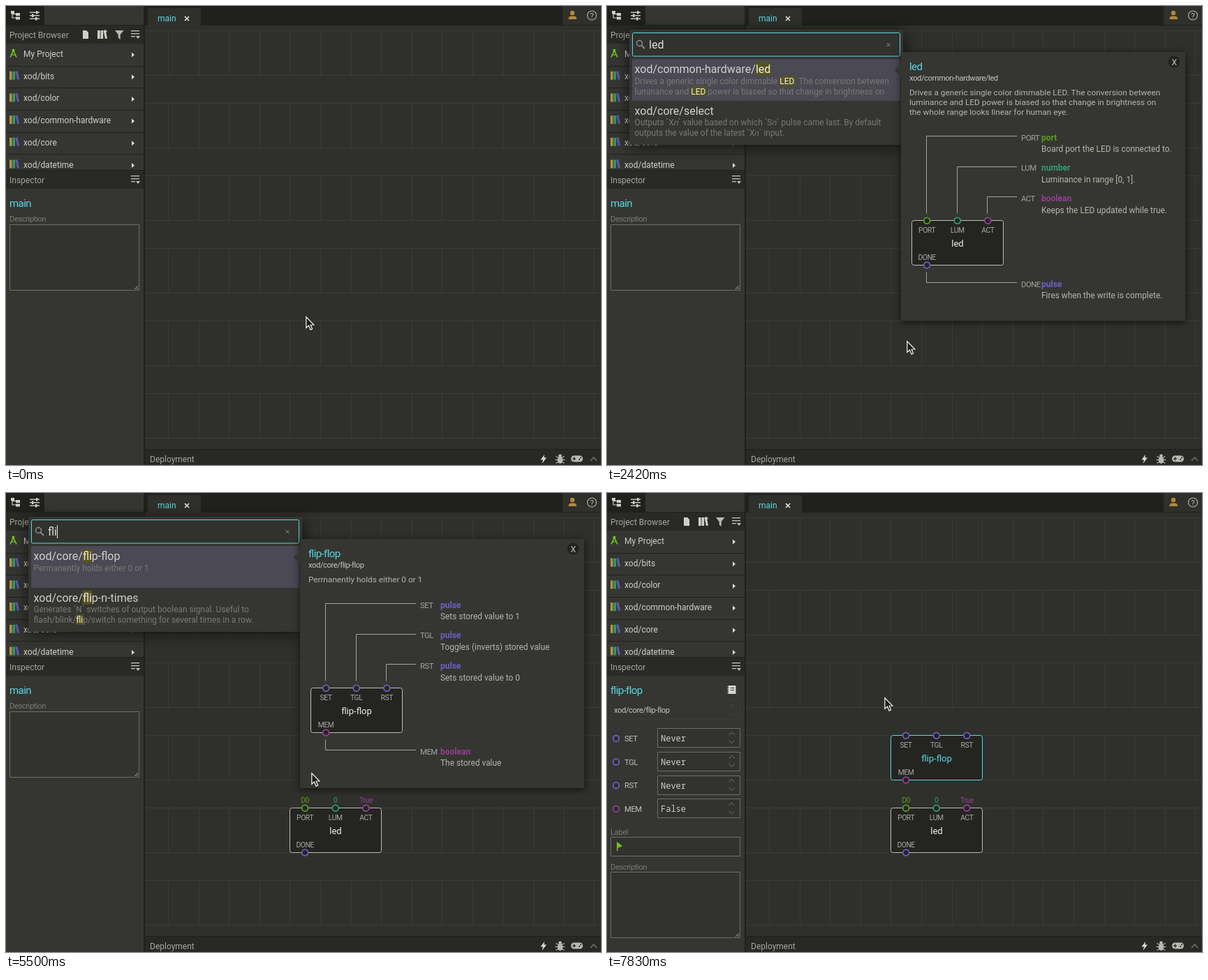
An HTML page with a canvas that plays this animation: 852 px wide and 658 px high, repeating every 8000 ms.

```html
<!DOCTYPE html>
<html lang="en">
<head>
<meta charset="utf-8">
<title>Quick node search</title>
<style>
html, body { margin: 0; width: 100%; height: 100%; overflow: hidden; background: #2f302b; }
canvas { display: block; }
</style>
</head>
<body>
<canvas id="stage" width="852" height="658"></canvas>
<script>
const g = document.getElementById('stage').getContext('2d');
const LOOP = 8000;
const SANS = 'Roboto, "Open Sans", sans-serif';
const MONO = '"Noto Sans Mono", "DejaVu Sans Mono", monospace';
const PITCH = 43.6, ROW = 59.5;

const C = {
  side: '#353632', head: '#292a26', top: '#20211d', canvas: '#2f302b', grid: '#3b3c37',
  cyan: '#5bd6e3', text: '#cfcfca', dim: '#7b7b75', soft: '#a5a59f', line: '#6c6d67',
  port: '#5a9e1c', number: '#2f9e73', boolean: '#933f97', pulse: '#6a5fc6', node: '#242521'
};

// Node library: inputs and outputs are [label, type, description lines...]
const NODES = {
  led: {
    path: 'xod/common-hardware/led',
    desc: ['Drives a generic single color dimmable LED. The conversion between',
      'luminance and LED power is biased so that change in brightness on',
      'the whole range looks linear for human eye.'],
    ins: [['PORT', 'port', 'Board port the LED is connected to.'],
      ['LUM', 'number', 'Luminance in range [0, 1].'],
      ['ACT', 'boolean', 'Keeps the LED updated while true.']],
    out: ['DONE', 'pulse', 'Fires when the write is complete.'],
    values: ['D0', '0', 'True']
  },
  'flip-flop': {
    path: 'xod/core/flip-flop',
    desc: ['Permanently holds either 0 or 1'],
    ins: [['SET', 'pulse', 'Sets stored value to 1'],
      ['TGL', 'pulse', 'Toggles (inverts) stored value'],
      ['RST', 'pulse', 'Sets stored value to 0']],
    out: ['MEM', 'boolean', 'The stored value']
  },
  'flip-n-times': {
    path: 'xod/core/flip-n-times',
    desc: ['Generates `N` switches of output boolean signal. Useful to',
      'flash/blink/flip/switch something for several times in a row.'],
    ins: [['N', 'number', 'Number of switches'],
      ['T', 'number', 'Time between switches'],
      ['RUN', 'pulse', 'Starts the sequence']],
    out: ['OUT', 'boolean', 'The current state']
  },
  clip: {
    path: 'xod/math/clip',
    desc: ['Clips an input value so that the value is always inside a [MIN, MAX] range.'],
    ins: [['X', 'number', 'The input value'],
      ['MIN', 'number', 'A lower bound of the range.'],
      ['MAX', 'number', 'An upper bound of the range.']],
    out: ['OUT', 'number', 'The result. Equals to `X` if it is', 'already in the range, otherwise, its',
      '`Xc` rounded to a nearest bound:', '`MIN` or `MAX`.']
  }
};

// Search results: [path, description lines...]
const R = {
  led: ['xod/common-hardware/led', ...NODES.led.desc.slice(0, 2)],
  less: ['xod/core/less', 'Outputs true if `IN1` < `IN2`, and false otherwise'],
  shift: ['xod/bits/shift-left', 'Performs logical left-shift of `IN` by `N` bits.'],
  clear: ['xod-dev/text-lcd/clear', 'Clears the LCD screen and positions the cursor in the upper-left corner'],
  mems: ['xod-dev/st-mems/example'],
  throttle: ['xod/core/throttle', 'Throttles input changes to happen no more often than once per interval',
    'specified. Useful to limit the rate of updates.'],
  json: ['xod/json/0-example'],
  select: ['xod/core/select', 'Outputs `X\u{1D45B}` value based on which `S\u{1D45B}` pulse came last. By default',
    'outputs the value of the latest `X\u{1D45B}` input.'],
  avail: ['xod/uart/is-available', 'Checks does UART have an available bytes to read'],
  bool: ['xod/json/boolean-value', 'Extracts a boolean from a JSON stream'],
  flop: ['xod/core/flip-flop', 'Permanently holds either 0 or 1'],
  times: ['xod/core/flip-n-times', ...NODES['flip-n-times'].desc],
  mapclip: ['xod/math/map-clip', 'Projects a number from one range to another preserving ratio. Then',
    'clips a result to the target range.'],
  clip: ['xod/math/clip', 'Clips an input value so that the value is always inside a [MIN, MAX]', 'range.'],
  mutex: ['xod/mutex/mutex', 'Describes a mutually exclusive resource. Used to avoid conflicts',
    'between nodes controlling long-running processes. No two processes']
};
const pick = keys => keys.split(' ').map(k => R[k]);
const LISTS = {
  le: pick('led less shift clear mems throttle json select avail bool'),
  led: pick('led select'),
  fl: pick('flop times mapclip clip mutex throttle less shift json bool'),
  fli: pick('flop times'),
  flip: pick('flop times mapclip clip mutex')
};

// Each entry changes only the listed parts of the state.
const CLOSED = { open: false, tip: '', list: '', query: '', sel: 0, caret: false };
const STEPS = [
  [0, { ...CLOSED, focus: false, nodes: [], active: '' }],
  [830, { open: true, caret: true }],
  [1000, { focus: true }],
  [1330, { caret: false }],
  [1580, { query: 'l', caret: true }],
  [1750, { query: 'le', list: 'le' }],
  [1830, { tip: 'led' }],
  [1920, { query: 'led', list: 'led' }],
  [2420, { caret: false }],
  [2920, { ...CLOSED, focus: false, nodes: [['led', 451.5]], active: 'led' }],
  [4080, { active: '' }],
  [4170, { open: true }],
  [4250, { focus: true, caret: true }],
  [4750, { caret: false }],
  [5170, { query: 'f', caret: true }],
  [5330, { query: 'fl', list: 'fl' }],
  [5420, { tip: 'flip-flop' }],
  [5500, { query: 'fli', list: 'fli' }],
  [5670, { query: 'flip', list: 'flip' }],
  [6170, { caret: false }],
  [6420, { sel: 3, tip: 'clip' }],
  [6500, { sel: 1, tip: 'flip-n-times' }],
  [6580, { sel: 0, tip: 'flip-flop' }],
  [7000, { focus: false }],
  [7500, { ...CLOSED, nodes: [['led', 451.5], ['flip-flop', 347.5]], active: 'flip-flop' }]
];
const POINTER = [
  [0, 429, 445], [80, 429, 454], [170, 429, 466], [330, 429, 471], [420, 429, 476], [830, 429, 480],
  [2920, 429, 486], [3080, 334, 439], [3250, 334, 437], [3420, 401, 414], [3830, 437, 401],
  [6330, 430, 381], [6420, 413, 333], [6500, 368, 212], [6580, 330, 122], [6670, 316, 90],
  [7670, 331, 128], [7750, 372, 235], [7830, 397, 293]
];

function stateAt(t) {
  const s = {};
  for (const [at, change] of STEPS) if (at <= t) Object.assign(s, change);
  return s;
}

function box(x, y, w, h, color) { g.fillStyle = color; g.fillRect(x, y, w, h); }

function frame(x, y, w, h, color, r = 0, fill) {
  g.beginPath();
  g.roundRect(x, y, w, h, r);
  if (fill) { g.fillStyle = fill; g.fill(); }
  g.strokeStyle = color; g.lineWidth = 1; g.stroke();
}

function poly(points, color, width) {
  g.beginPath();
  for (let i = 0; i < points.length; i += 2) g.lineTo(points[i], points[i + 1]);
  if (width) { g.strokeStyle = color; g.lineWidth = width; g.stroke(); }
  else { g.fillStyle = color; g.fill(); }
}

function dot(x, y, r, color) {
  g.beginPath(); g.arc(x, y, r, 0, 7);
  g.fillStyle = color; g.fill();
}

function ring(x, y, r, color, width = 1, fill) {
  g.beginPath(); g.arc(x, y, r, 0, 7);
  if (fill) { g.fillStyle = fill; g.fill(); }
  g.strokeStyle = color; g.lineWidth = width; g.stroke();
}

function text(s, x, y, color = C.text, size = 12, align = 'left', family = SANS, weight = '') {
  g.font = `${weight} ${size}px ${family}`;
  g.textAlign = align;
  g.fillStyle = color;
  g.fillText(s, x, y);
}

// Tighter setting for the narrow labels.
function narrow(s, x, y, color, size = 12, align) {
  g.letterSpacing = `${-0.038 * size}px`;
  text(s, x, y, color, size * 0.94, align);
  g.letterSpacing = '0px';
}

function marked(s, x, y, size, color, query) {
  g.font = `${size}px ${SANS}`;
  for (const part of s.split(new RegExp(`(${query})`, 'i'))) {
    const w = g.measureText(part).width;
    const hit = part.toLowerCase() === query;
    if (hit) box(x - 0.5, y - size, w + 1, size * 1.22, '#57531f');
    text(part, x, y, hit ? '#f1f1e2' : color, size);
    x += w;
  }
}

function menuIcon(y) {
  for (let i = 0; i < 3; i++) box(179, y - 6 + i * 4, i < 2 ? 12 : 6, 1.3, '#c2c2bc');
  poly([186, y + 2, 192, y + 2, 189, y + 6], '#c2c2bc');
}

function books(x, y, colors) {
  box(x, y - 6, 3.6, 12, colors[0]);
  box(x + 4.5, y - 6, 3.6, 12, colors[1]);
  poly([x + 8.5, y - 6, x + 11.5, y - 6.5, x + 14, y + 5.5, x + 11, y + 6], colors[2]);
}

function topBar() {
  const ink = '#d0d0ca';
  box(0, 0, 852, 28, C.top);
  box(55, 0, 142, 27, C.side);
  box(797, 0, 55, 27, C.canvas);
  poly([9, 9, 9, 17, 14, 17], ink, 1.2);
  poly([9, 11.5, 14, 11.5], ink, 1.2);
  box(7, 7, 5, 4, ink); box(14, 10, 6, 4, ink); box(14, 15.5, 6, 4, ink);
  [[8.5, 43], [13, 37], [17.5, 42]].forEach(([y, x]) => {
    box(34, y, 14, 1.4, ink); box(x, y - 1.5, 2.5, 4.5, ink);
  });
  g.beginPath(); g.roundRect(203, 3, 76, 30, [3, 3, 0, 0]); g.fillStyle = C.canvas; g.fill();
  text('main', 217, 22, C.cyan);
  poly([256, 15, 262, 21], '#e0e0da', 1.7);
  poly([262, 15, 256, 21], '#e0e0da', 1.7);
  dot(811, 10, 3.2, '#b5873c');
  g.beginPath(); g.roundRect(805.5, 14.5, 11.5, 4.5, [4, 4, 0, 0]); g.fill();
  ring(839, 13.5, 6.5, '#aeaea8', 1.2);
  text('?', 839, 17.5, '#bdbdb7', 11, 'center');
}

function grid() {
  box(199, 28, 653, 608, C.canvas);
  g.fillStyle = C.grid;
  for (let y = 35; y < 630; y += 104) {
    g.fillRect(199, y, 653, 1);
    g.fillRect(199, y + 64, 653, 1);
    for (let x = 232.4; x < 852; x += PITCH) g.fillRect(Math.floor(x), y, 1, 64);
  }
}

function bottomBar() {
  const ink = '#b9b9b3';
  box(199, 635, 653, 23, '#282925');
  box(199, 635, 653, 1.5, '#21221e');
  text('Deployment', 206, 654, C.soft);
  poly([771, 643, 765.5, 650.5, 769, 650.5, 767.5, 656, 774, 647.5, 770.5, 647.5], '#dadad4');
  g.beginPath(); g.ellipse(793.5, 651, 3.8, 5, 0, 0, 7); g.fillStyle = ink; g.fill();
  dot(793.5, 645, 2.4, ink);
  for (const d of [-1, 1]) {
    poly([793.5, 650.5, 793.5 + d * 7, 650.5], ink, 1.2);
    poly([793.5, 649, 793.5 + d * 6, 645.5], ink, 1.2);
    poly([793.5, 652, 793.5 + d * 6, 655.5], ink, 1.2);
  }
  g.beginPath(); g.roundRect(809, 644.5, 17, 9, 4.5); g.fillStyle = ink; g.fill();
  box(811, 648.5, 5, 1.3, '#282925'); box(812.9, 646.6, 1.3, 5, '#282925');
  dot(821, 650, 1.1, '#282925'); dot(823, 647.5, 1.1, '#282925');
  poly([837, 652, 841.5, 647, 846, 652], '#6b6c66', 1.8);
}

function browser() {
  box(0, 28, 197, 630, C.side);
  box(0, 28, 197, 26, C.head);
  text('Project Browser', 5, 45.5, C.soft);
  const ink = '#d0d0ca';
  poly([110, 35, 115, 35, 118, 38, 118, 47, 110, 47], ink);
  books(131, 41, [ink, ink, ink]);
  box(140, 36, 5, 1.2, ink); box(142, 34, 1.2, 5, ink);
  poly([156, 35, 168.5, 35, 163.7, 41, 163.7, 48, 160.7, 45.5, 160.7, 41], '#b9b9b3');
  menuIcon(41);
  g.save();
  g.beginPath(); g.rect(0, 54, 197, 181); g.clip();
  ['My Project', 'xod/bits', 'xod/color', 'xod/common-hardware', 'xod/core', 'xod/datetime'].forEach((s, i) => {
    const y = 69 + i * 31.7;
    box(0, Math.round(y + 16.5), 197, 1, '#20211d');
    text(s, 25, Math.round(y + 4), C.text);
    poly([180, y - 2.5, 184, y + 1, 180, y + 4.5], '#dededa');
    if (i) books(5, y - 1, ['#b3923d', '#2d9a72', '#6058b0']);
    else {
      poly([6, 73.5, 10.5, 64, 15, 73.5], '#72c31e', 1.7);
      poly([7.5, 70, 13.5, 70], '#72c31e', 1.3);
      dot(10.5, 63.5, 2, '#72c31e');
    }
  });
  g.restore();
  box(0, 235, 197, 27, C.head);
  box(0, 235, 197, 1, '#1f201c');
  text('Inspector', 5, 253.5, C.soft);
  menuIcon(249);
  box(197, 0, 2, 658, '#20211d');
}

function area(y) {
  frame(5.5, y + 0.5, 185, 94, C.line, 0, '#32332e');
  poly([184, y + 93, 189, y + 88], '#b0b0aa', 1);
  poly([187, y + 93, 189, y + 91], '#b0b0aa', 1);
}

function arrows(y, color) {
  poly([174.5, y - 4, 178.5, y - 8, 182.5, y - 4], color, 1);
  poly([174.5, y + 4, 178.5, y + 8, 182.5, y + 4], color, 1);
}

function inspector(name) {
  narrow(name || 'main', 5, 287.5, C.cyan, 16);
  if (!name) {
    narrow('Description', 5, 309, C.dim);
    area(313);
    return;
  }
  const n = NODES[name];
  box(174, 276, 10.5, 12, '#d4d4ce');
  for (let y = 277; y < 288; y += 3) box(172.5, y, 3, 1.2, '#d4d4ce');
  box(177, 279, 5, 1, C.side); box(177, 282, 5, 1, C.side);
  frame(5.5, 297.5, 185, 27, '#3b3c37');
  narrow(n.path, 10, 315, '#c4c4be');
  arrows(311, '#474842');
  const fields = name === 'led' ? ['D0', '0', 'True', 'pulse'] : ['Never', 'Never', 'Never', 'False'];
  [...n.ins, n.out].forEach(([label, type], i) => {
    const y = 351.3 + i * 33.7, v = fields[i], top = Math.round(y - 14) + 0.5;
    ring(13, y + 0.5, 4.3, C[type], 1.8, '#2c2d28');
    narrow(label, 25, y + 4.5, '#c0c0ba');
    if (v === 'pulse') {
      frame(72.5, top, 118, 27, '#3c3d38');
      text(v, 131.5, y + 5, '#52534d', 12, 'center', MONO);
      return;
    }
    frame(72.5, top, 118, 27, C.line, 0, '#32332e');
    const right = v.length < 3;
    text(v, right ? 186.5 : 77, y + 5, C.text, 12, right ? 'right' : 'left', MONO);
    if (!right) arrows(y - 0.5, '#777872');
  });
  narrow('Label', 5, 489.5, C.dim);
  frame(5.5, 493.5, 185, 27, C.line, 0, '#32332e');
  poly([14, 500, 22, 506, 15.5, 509, 15.5, 513, 14, 513], '#72c31e');
  narrow('Description', 5, 539.5, C.dim);
  area(543);
}

function node(name, x, y, active, values) {
  const n = NODES[name];
  frame(x, y, 131, 64, active ? C.cyan : '#bcbcb6', 3, C.node);
  const pin = (p, px, py, labelY) => {
    ring(px, py, 4.4, C[p[1]], 1.8, C.node);
    narrow(p[0], px, labelY, '#a9a9a3', 11, 'center');
  };
  n.ins.forEach((p, i) => {
    const px = x + 21.6 + i * PITCH;
    pin(p, px, y + 0.3, y + 17.5);
    if (values && n.values) narrow(n.values[i], px, y - 8, C[p[1]], 11, 'center');
  });
  pin(n.out, x + 21.6, y + 64, y + 56);
  text(name, x + 65.5, y + 37, active ? C.cyan : '#eeeeea', 13, 'center');
}

function panel(x, y, w, h, blur, drop) {
  g.save();
  g.shadowColor = 'rgba(0,0,0,.65)';
  g.shadowBlur = blur;
  g.shadowOffsetY = drop;
  box(x, y, w, h, '#353631');
  g.restore();
}

function search(s) {
  const list = LISTS[s.list] || [];
  const bottom = list.length ? 80 + ROW * list.length : 76;
  panel(32, 34, 392, bottom - 34, 20, 3);
  frame(36.5, 38.5, 383, 33.5, s.focus ? C.cyan : '#777872', 2, '#31322d');
  ring(46.5, 53.5, 4, '#8d8e88', 1.5);
  poly([49.5, 56.5, 54, 61], '#8d8e88', 1.8);
  text(s.query, 60, 61, '#dfdfd9', 16);
  if (s.caret) box(Math.round(60 + g.measureText(s.query).width), 46, 1, 19, '#f0f0ea');
  if (s.query && s.focus) {
    poly([400.5, 53, 405.5, 58], '#8d8e88', 1);
    poly([405.5, 53, 400.5, 58], '#8d8e88', 1);
  }
  list.forEach(([path, ...lines], i) => {
    const y = 76 + i * ROW;
    if (i === s.sel) box(36, Math.round(y), 384, 60, '#4a4954');
    marked(path, 39.5, Math.round(y + 20), 16, '#d0d0ca', s.query);
    lines.forEach((line, k) => marked(line, 39.5, Math.round(y + 35.7 + k * 15), 11.95, '#797a75', s.query));
  });
}

function tip(name, row) {
  const n = NODES[name], y = Math.round(66 + row * ROW);
  const shift = (n.desc.length - 1) * 14;
  const extra = (n.out.length - 3) * 14;
  panel(421, y, 407, 357 + shift + extra, 10, 2);
  poly([411.5, y + 26, 421.5, y + 16, 421.5, y + 36], '#353631');
  dot(812, y + 14, 8.5, '#22231f');
  narrow('X', 812, y + 18.5, '#c4c4be', 13, 'center');
  narrow(name, 433, y + 26, C.cyan, 16);
  narrow(n.path, 433, y + 41, '#c4c4be');
  n.desc.forEach((line, i) => text(line, 433, y + 62 + i * 14, '#b5b5af', 11.8));
  const top = y + shift + 213.5;
  const label = (p, cy) => {
    narrow(p[0], 593, cy + 4.5, C.soft);
    text(p[1], 622, cy + 4.5, C[p[1]], 12, 'left', SANS, 'bold');
    p.slice(2).forEach((line, i) => text(line, 622, cy + 21.3 + i * 14, '#b5b5af', 11.9));
  };
  n.ins.forEach((p, i) => {
    const cy = y + shift + 94 + i * PITCH, px = Math.floor(457.6 + i * PITCH) + 0.5;
    const ly = Math.round(cy - 2) + 0.5;
    poly([587, ly, px, ly, px, top - 10], '#a3a49e', 1);
    label(p, cy);
  });
  poly([457.5, top + 74, 457.5, top + 89, 587, top + 89], '#a3a49e', 1);
  label(n.out, top + 90.5);
  node(name, 436.5, top, false, false);
}

function pointer(t) {
  const [, x, y] = POINTER.filter(p => p[0] <= t).pop();
  g.save();
  g.translate(x + 0.8, y + 0.8);
  g.beginPath();
  [[0, 0], [0, 15.5], [3.6, 12.3], [6.2, 18.3], [8.8, 17.2], [6.3, 11.4], [11, 11.2]].forEach(p => g.lineTo(...p));
  g.closePath();
  g.fillStyle = '#1d1e1a'; g.fill();
  g.strokeStyle = '#f4f4f0'; g.lineWidth = 1.2; g.stroke();
  g.restore();
}

function draw(t) {
  const s = stateAt(t);
  topBar();
  grid();
  bottomBar();
  browser();
  inspector(s.active);
  for (const [name, y] of s.nodes) node(name, 406.5, y, name === s.active, true);
  if (s.open) search(s);
  if (s.tip) tip(s.tip, s.sel);
  pointer(t);
}

const start = performance.now();
function tick() {
  draw((performance.now() - start) % LOOP);
  requestAnimationFrame(tick);
}
tick();
</script>
</body>
</html>
```
